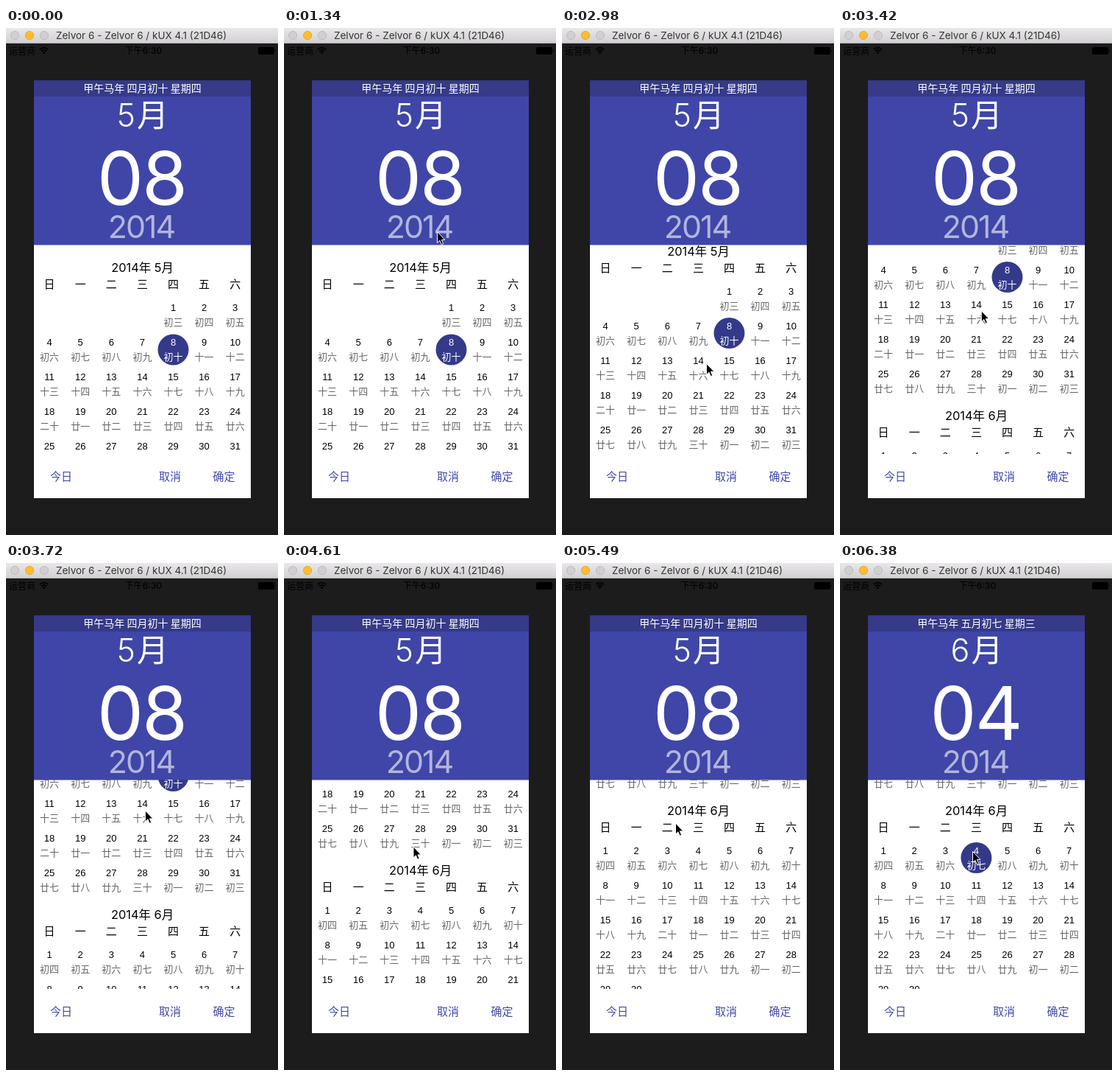
Write an HTML page that moves like this. It is 370x688 px and loops after 8000 ms.

```html
<!DOCTYPE html>
<html lang="zh-CN">
<head>
<meta charset="utf-8">
<title>Calendar picker</title>
<style>
html, body { margin: 0; width: 100%; height: 100%; overflow: hidden; background: #1c1c1c; }
svg { display: block; width: 100vw; height: 100vh; }
text { font-family: "Noto Sans CJK SC", "Noto Sans CJK JP", sans-serif; text-anchor: middle; white-space: pre; }
.ui { font-family: Inter, "Noto Sans CJK SC", "Noto Sans CJK JP", sans-serif; }
.left { text-anchor: start; }
.num { font-family: "Liberation Sans", Arial, sans-serif; font-size: 13px; }
.lunar { font-size: 13px; fill: #666; }
.week { font-size: 15px; }
.month { font-size: 16.4px; }
.picked text { fill: #fff; }
.picked circle { fill: #343a89; }
.btn { font-size: 15px; fill: #3f46a8; }
</style>
</head>
<body>
<svg viewBox="0 0 370 688">
  <defs>
    <linearGradient id="bar" x2="0" y2="1">
      <stop offset="0" stop-color="#e9e7e9"/>
      <stop offset="1" stop-color="#d1cfd1"/>
    </linearGradient>
    <clipPath id="view"><rect x="38" y="294" width="295" height="284"/></clipPath>
  </defs>
  <rect width="370" height="688" fill="#1c1c1c"/>

  <rect width="370" height="21" fill="url(#bar)"/>
  <rect y="20" width="370" height="1" fill="#b5b3b5"/>
  <g stroke-width=".8">
    <circle cx="12" cy="10" r="5.6" fill="#d2cfd2" stroke="#b7b4b7"/>
    <circle cx="32" cy="10" r="5.6" fill="#fdbd2f" stroke="#dfa023"/>
    <circle cx="52" cy="10" r="5.6" fill="#d2cfd2" stroke="#b7b4b7"/>
  </g>
  <text class="ui left" x="68" y="15" font-size="13.5" fill="#353535">Zelvor 6 - Zelvor 6 / kUX 4.1 (21D46)</text>

  <text class="left" x="4" y="35.5" font-size="12">运营商</text>
  <g fill="none" stroke="#000" stroke-width="1.7">
    <path d="M45.8 29.2Q51.5 24.2 57.2 29.2M47.8 31.6Q51.5 28.4 55.2 31.6"/>
    <path d="M49.3 33.1Q51.5 31.4 53.7 33.1L51.5 35.4Z" fill="#000" stroke="none"/>
  </g>
  <text class="ui" x="187" y="35.3" font-size="12" font-weight="500">下午6:30</text>
  <rect x="343" y="26" width="22" height="10" rx="2" fill="#000"/>
  <path d="M366 29Q368 31 366 33Z"/>

  <rect x="38" y="71" width="295" height="567" fill="#fff"/>
  <rect x="38" y="71" width="295" height="223.5" fill="#3f46a8"/>
  <rect x="38" y="71" width="295" height="22" fill="#363a88"/>
  <g fill="#fff">
    <text id="lunarDate" x="185.5" y="87" font-size="14" font-weight="500"></text>
    <text id="bigMonth" class="ui" x="187" y="133.5" font-size="43" font-weight="350" letter-spacing="2"></text>
    <text id="bigDay" class="ui" x="184.5" y="240" font-size="100.5" letter-spacing="-2"></text>
    <text class="ui" x="184" y="285" font-size="43" letter-spacing="-2" fill-opacity=".6">2014</text>
  </g>

  <g clip-path="url(#view)"><g id="list"></g></g>

  <text class="btn" x="75" y="613.5">今日</text>
  <text class="btn" x="223" y="613.5">取消</text>
  <text class="btn" x="296.5" y="613.5">确定</text>

  <path id="cursor" d="M0 0V15L3.4 11.8 5.7 17.2 8.2 16.2 5.9 10.9H10.4Z" fill="#000" stroke="#fff" stroke-linejoin="round"/>
</svg>
<script>
// The screen refreshes once per STEP; all motion is a function of the step count.
const LOOP = 8000, START = 894, STEP = 148.2, PICK = 37;
const DIGITS = "一二三四五六七八九十";
const $ = id => document.getElementById(id);

// Pointer stops: step, x, y
const stops = [
  [0, 329, 243], [3, 208.5, 276.5], [5, 203, 486], [7, 196, 424], [10, 199, 496], [12.3, 199, 496],
  [19, 189.5, 336], [23, 190, 435], [28, 155, 310], [30, 155, 310], [31, 154.5, 353], [34, 180.5, 391.5]
];

const progress = (k, a, b) => Math.min(1, Math.max(0, (k - a) / (b - a)));

function ease(k, a, b) {
  const p = progress(k, a, b);
  return p * p * (3 - 2 * p);
}

// Two flicks of the list
const scroll = k => -172 * ease(k, 11.9, 21.2) - 116.5 * ease(k, 23.26, 28);

function pointer(k) {
  const i = Math.max(1, stops.findIndex(s => s[0] >= k));
  const [a, b] = k >= stops.at(-1)[0] ? stops.slice(-2) : [stops[i - 1], stops[i]];
  const p = progress(k, a[0], b[0]);
  return [a[1] + (b[1] - a[1]) * p, a[2] + (b[2] - a[2]) * p];
}

function lunarName(n) {
  if (n === 20) return "二十";
  if (n === 30) return "三十";
  return ["初", "十", "廿"][n > 10 ? Math.floor(n / 10) : 0] + DIGITS[(n - 1) % 10];
}

const colX = c => 59.1 + 42.1 * c;
const label = (cls, x, y, s) => `<text class="${cls}" x="${x}" y="${y}">${s}</text>`;

function monthMarkup(month, top, first, days, lunar, lunarDays, picked) {
  let out = label("ui month", 185.5, top + 6, `2014年 ${month}月`);
  [..."日一二三四五六"].forEach((s, c) => out += label("week", colX(c), top + 28, s));
  for (let d = 1; d <= days; d++) {
    const cell = first + d - 1, x = colX(cell % 7), y = top + 54 + 47 * Math.floor(cell / 7);
    const n = (lunar + d - 2) % lunarDays + 1;
    const text = label("num", x, y + 5, d) + label("lunar", x, y + 25.3, lunarName(n));
    out += d === picked
      ? `<g id="pick${month}"><circle cx="${x}" cy="${y + 10.5}" r="21" fill="none"/>${text}</g>`
      : text;
  }
  return out;
}

$("list").innerHTML = monthMarkup(5, 325, 4, 31, 3, 30, 8) + monthMarkup(6, 624, 0, 30, 4, 29, 4);

function render(t) {
  const k = Math.floor((t - START) / STEP), june = k >= PICK;
  $("list").setAttribute("transform", `translate(0 ${Math.round(scroll(k) * 2) / 2})`);
  $("cursor").setAttribute("transform", `translate(${pointer(k)})`);
  $("cursor").style.display = k < 0 ? "none" : "";
  $("pick5").classList.toggle("picked", !june);
  $("pick6").classList.toggle("picked", june);
  $("lunarDate").textContent = june ? "甲午马年 五月初七 星期三" : "甲午马年 四月初十 星期四";
  $("bigMonth").textContent = june ? "6月" : "5月";
  $("bigDay").textContent = june ? "04" : "08";
}

const begin = performance.now();
function tick() {
  render((performance.now() - begin) % LOOP);
  requestAnimationFrame(tick);
}
tick();
</script>
</body>
</html>
```
